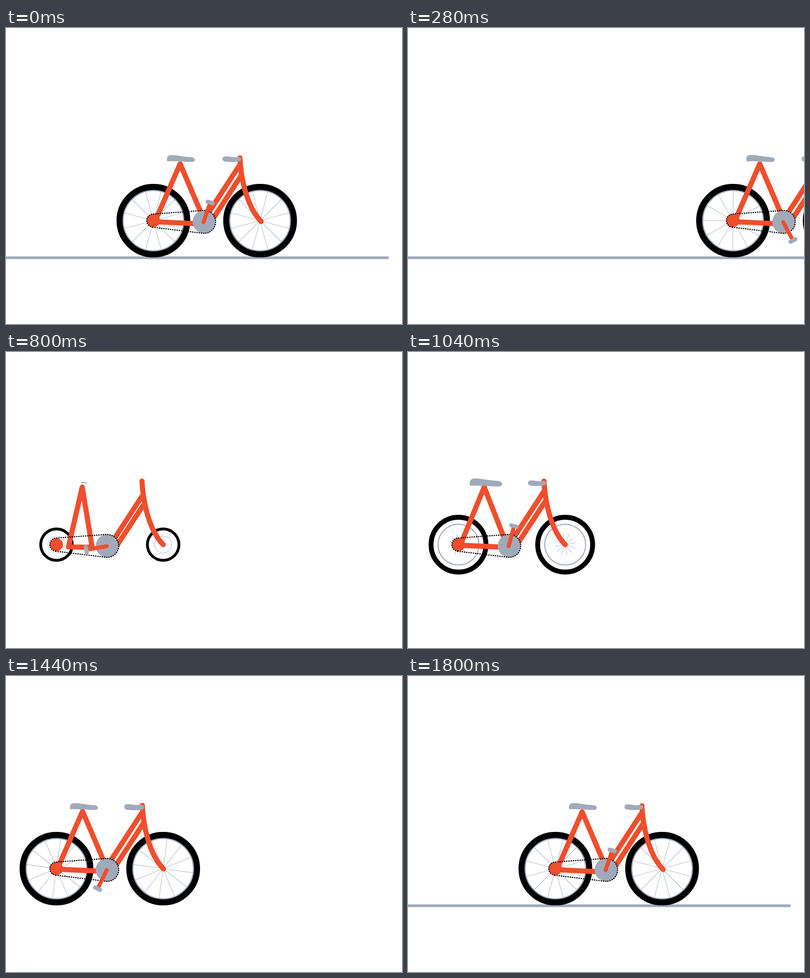
Recreate the animation shown at these times as an HTML page with a canvas. Size 800 by 600 pixels, loop 1.84 s.

```html
<!DOCTYPE html>
<html lang="en">
<head>
<meta charset="utf-8">
<title>Bicycle</title>
<style>
html, body { margin: 0; width: 100%; height: 100%; overflow: hidden; background: #fff; }
canvas { display: block; }
</style>
</head>
<body>
<canvas id="stage" width="800" height="600"></canvas>
<script>
const ctx = document.getElementById('stage').getContext('2d');
const RED = '#f04e2c', GREY = '#a0aaba', BLACK = '#000';
const LOOP = 1840, STEP = 40, RIDE = 1800, PUSH = 1640;
const REAR = 102, FRONT = 317.5, AXLE = 390.5, TUBE = 10.4;
const RING = { x: 204.5, y: 393, r: 23.2 };
const rad = deg => deg * Math.PI / 180;

function ramp(t, t0, t1, from, to) {
  const u = Math.min(1, Math.max(0, (t - t0) / (t1 - t0)));
  return from + (to - from) * u;
}

// Damped swing from 0 to 1
function spring(t, t0) {
  const u = t - t0;
  return u <= 0 ? 0 : 1 - Math.exp(-0.0037 * u) * Math.cos(Math.PI * u / 450);
}

// Fast start, long glide
function travel(t) {
  if (t <= PUSH) return 0;
  const u = 0.00452 * (t - PUSH + 37);
  return 874 * (1 - (1 + u) * Math.exp(-u));
}

function stroke(color, width) {
  ctx.strokeStyle = color;
  ctx.lineWidth = width;
  ctx.stroke();
}

function line(color, width, x1, y1, x2, y2) {
  ctx.beginPath();
  ctx.moveTo(x1, y1);
  ctx.lineTo(x2, y2);
  stroke(color, width);
}

function circle(x, y, r) {
  ctx.beginPath();
  ctx.arc(x, y, r, 0, 2 * Math.PI);
}

function disc(x, y, r, color) {
  circle(x, y, r);
  ctx.fillStyle = color;
  ctx.fill();
}

function wheel(x, t) {
  const tyre = ramp(t, 480, 1172, 0.5, 74.5), width = tyre * 0.163;
  const rim = ramp(t, 630, 1240, 0, 61.5);
  const spoke = Math.min(rim, ramp(t, 860, 1380, 0, 62));
  if (spoke > 0) {
    const turn = 15 + 0.27 * (t - RIDE);
    ctx.beginPath();
    for (let i = 0; i < 12; i++) {
      const a = rad(turn + 30 * i);
      ctx.moveTo(x, AXLE);
      ctx.lineTo(x + spoke * Math.cos(a), AXLE + spoke * Math.sin(a));
    }
    stroke('#b8c0cc', 1.1);
  }
  if (rim > 0) {
    circle(x, AXLE, rim);
    stroke(GREY, rim * 0.05);
  }
  circle(x, AXLE, tyre - width / 2);
  stroke(BLACK, width);
}

function downTube(x, y, drop) {
  line(RED, TUBE, x, y, x - 0.65 * drop, y + drop);
}

function frame(t) {
  const k = ramp(t, 600, 1076, 0, 1);
  const settle = ramp(t, 800, 1200, 0, 1);
  const sway = ramp(t, 1280, 1800, 0, 2);
  const apex = 154;

  ctx.save();
  ctx.translate(sway, sway * 0.8);
  ctx.beginPath();
  ctx.moveTo(apex, 273.8);
  ctx.lineTo(apex - 51 * k ** 0.7, 396 - 5 * k * k);
  ctx.lineTo(apex + 52 * k ** 1.1, 396);
  ctx.closePath();
  stroke(RED, TUBE);

  downTube(275, 292 - 17 * settle, 83 + 20 * settle);
  downTube(277, 311 - 13 * settle, 80 + 4 * settle);

  ctx.translate(274.7, 261.6);
  ctx.rotate(rad(ramp(t, 480, 800, -45, 0)));
  ctx.beginPath();
  ctx.moveTo(0, 0);
  ctx.bezierCurveTo(2, 40, 13, 98, 43, 129);
  stroke(RED, TUBE);
  ctx.restore();
}

function chain() {
  const r = 13.4, dx = RING.x - REAR, dy = RING.y - AXLE;
  const tilt = Math.atan2(dy, dx), open = Math.acos((r - RING.r) / Math.hypot(dx, dy));
  ctx.beginPath();
  ctx.arc(REAR, AXLE, r, tilt + open, tilt - open + 2 * Math.PI);
  ctx.arc(RING.x, RING.y, RING.r, tilt - open, tilt + open);
  ctx.closePath();
  ctx.setLineDash([0.6, 3.9]);
  stroke(BLACK, 2.4);
  ctx.setLineDash([]);
}

function crank(t) {
  const speed = t < 800 ? 0.385 : 0.4785;
  ctx.save();
  ctx.translate(203.5, 393.5);
  ctx.rotate(rad(169.8 + (t - 800) * speed));
  line(RED, 8, 0, 0, 40, 0);
  line(GREY, 8.4, 42, -5.5, 42, 5.5);
  ctx.restore();
}

function blob(x, y, k, outline) {
  if (k <= 0) return;
  ctx.save();
  ctx.translate(x, y);
  ctx.scale(k, k);
  ctx.beginPath();
  outline();
  ctx.closePath();
  ctx.fillStyle = GREY;
  ctx.fill();
  ctx.restore();
}

function seat() {
  ctx.moveTo(-29, 4);
  ctx.bezierCurveTo(-30, -4, -27, -7.6, -19, -7.6);
  ctx.bezierCurveTo(-8, -7.6, 2, -4, 20, -3.2);
  ctx.bezierCurveTo(31.5, -2.6, 32, 6.6, 22, 7);
  ctx.bezierCurveTo(10, 7.2, -5, 5, -24, 5.4);
  ctx.bezierCurveTo(-27, 5.6, -29, 5.8, -29, 4);
}

function grip() {
  ctx.moveTo(-34, -6);
  ctx.bezierCurveTo(-26, -6.5, -17, -3, -5, -4.8);
  ctx.bezierCurveTo(1.5, -5, 1.5, 4, -4, 4.8);
  ctx.bezierCurveTo(-14, 6.6, -24, 6, -34, 5);
  ctx.bezierCurveTo(-41, 4, -41, -5.4, -34, -6);
}

function bike(t) {
  const s = ramp(t, 474, 762, 0, 1);
  ctx.save();
  ctx.translate(210 + travel(t), 207);
  ctx.scale(s, s);
  ctx.translate(-210, -207);
  wheel(REAR, t);
  wheel(FRONT, t);
  frame(t);
  disc(REAR, AXLE, 13.2, RED);
  disc(RING.x, RING.y, RING.r, GREY);
  chain();
  crank(t);
  blob(157.7, 264.8, 0.98 * spring(t, 750), seat);
  blob(279, 266, 0.98 * spring(t, 830), grip);
  ctx.restore();
}

// The road runs in from the left, then its tail follows
function ground(t) {
  const speed = 4.816;
  const tail = Math.max(0, t - 2400) * speed, head = (t - PUSH) * speed;
  if (head > 0) line(GREY, 5.6, tail, 465.8, head, 465.8);
}

function ride(t) {
  ground(t);
  bike(t);
}

function draw(now) {
  const t = Math.floor(now % LOOP / STEP) * STEP;
  ctx.fillStyle = '#fff';
  ctx.fillRect(0, 0, 800, 600);
  ctx.lineCap = ctx.lineJoin = 'round';
  if (t < 800) ride(t + RIDE);
  if (t >= 480) ride(t);
}

const start = performance.now();
function tick() {
  draw(performance.now() - start);
  requestAnimationFrame(tick);
}
tick();
</script>
</body>
</html>
```
